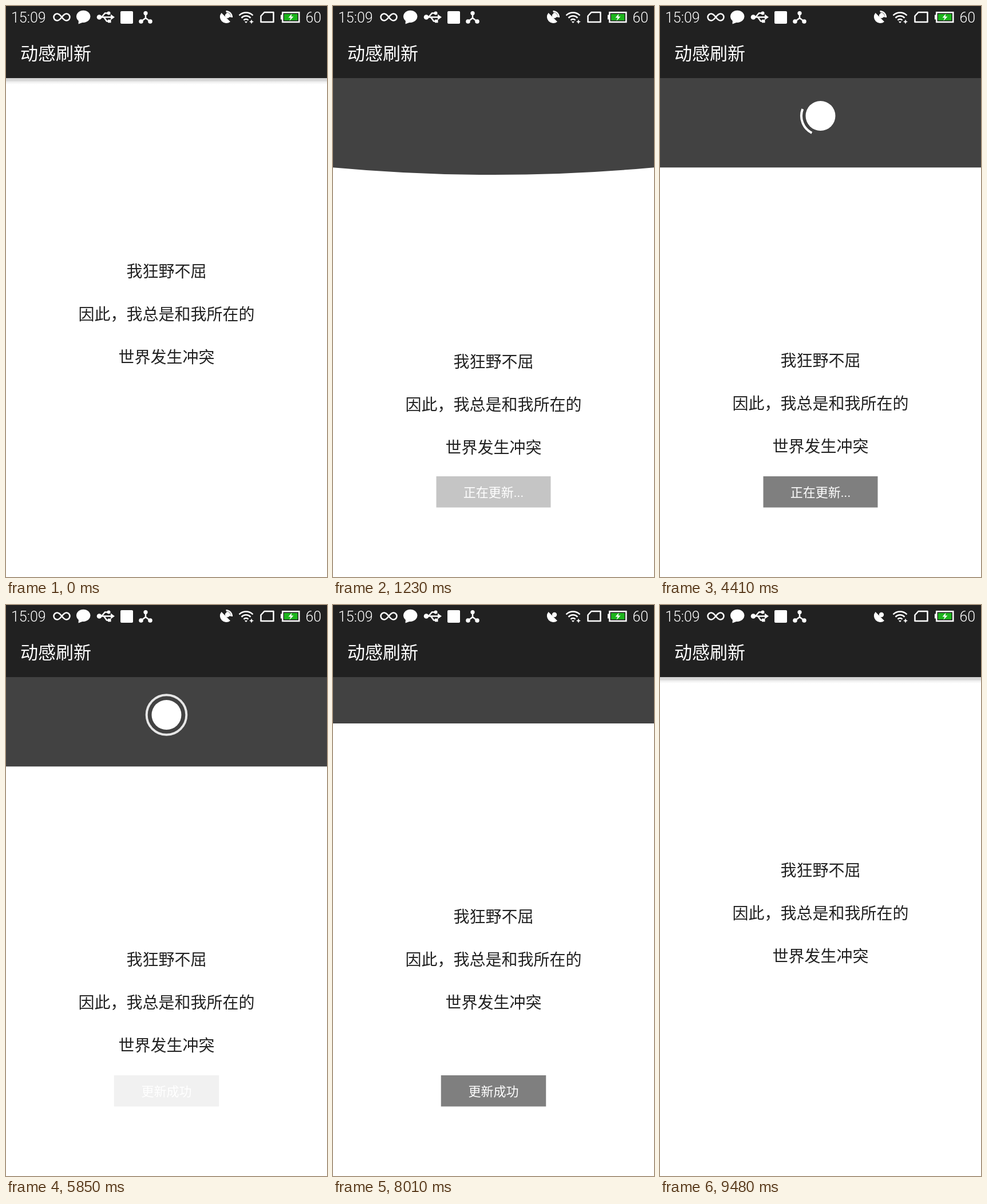
An HTML page for the animation above (9510 ms loop, 561 by 998 pixels).

```html
<!DOCTYPE html>
<html lang="zh-CN">
<head>
<meta charset="utf-8">
<title>动感刷新</title>
<style>
html, body { margin: 0; width: 100%; height: 100%; overflow: hidden; background: #fff; }
svg { display: block; width: 561px; height: 998px; }
text { font-family: Roboto, "Noto Sans CJK SC", "Noto Sans CJK", sans-serif; }
.light { font-weight: 300; font-size: 25px; }
.mid { text-anchor: middle; }
.line { fill: none; stroke: #fff; stroke-width: 2.5; }
</style>
</head>
<body>
<svg viewBox="0 0 561 998" fill="#fff">
  <defs>
    <linearGradient id="shade" x2="0" y2="1">
      <stop offset="0" stop-color="#d0d0d0"/>
      <stop offset=".45" stop-color="#dadada"/>
      <stop offset=".55" stop-color="#ececec"/>
      <stop offset="1" stop-color="#fff"/>
    </linearGradient>
  </defs>
  <rect width="561" height="998"/>
  <rect y="126" width="561" height="11" fill="url(#shade)"/>

  <g transform="translate(0 126)">
    <path id="header" fill="#424242"/>
    <path id="tail"/>
    <circle id="ball" cx="280.5" r="26"/>
    <path id="ring" class="line" style="stroke-width:4"/>
  </g>

  <g id="verse" class="mid" fill="#212121" font-size="28">
    <text x="280.5" y="474">我狂野不屈</text>
    <text x="280.5" y="549">因此，我总是和我所在的</text>
    <text x="280.5" y="624">世界发生冲突</text>
  </g>

  <g id="toast">
    <rect id="plate" y="822" height="54.5" fill="#000" fill-opacity=".5"/>
    <text id="label" class="mid" x="280.5" y="857.5" font-size="22"></text>
  </g>

  <rect width="561" height="126" fill="#212121"/>
  <text x="25" y="94" font-size="31">动感刷新</text>
  <text class="light" x="9" y="29">15:09</text>
  <text class="light" x="523.5" y="29">60</text>

  <!-- status icons, left -->
  <path class="line" d="M97.5 19.5C94 15 92 13.5 89.5 13.5a6 6 0 0 0 0 12C92 25.5 94 24 97.5 19.5S103 13.5 105.5 13.5a6 6 0 0 1 0 12C103 25.5 101 24 97.5 19.5Z"/>
  <ellipse cx="135.2" cy="18.3" rx="12.2" ry="10.6"/>
  <path d="M127 24L126.5 31.5L136 28Z"/>
  <path class="line" d="M163 19.5H184M167 19.5L173 12.5H179M171 19.5L176 26.5H180"/>
  <circle cx="163" cy="19.5" r="4.3"/>
  <circle cx="179.5" cy="12.5" r="3"/>
  <path d="M183 14.5L190 19.5L183 24.5ZM178 23.7h5.5v5.5h-5.5Z"/>
  <rect x="200" y="9" width="22" height="22" rx="2"/>
  <path class="line" d="M244 13V21L236 27M244 21L252 27"/>
  <circle cx="244" cy="12.5" r="3.6"/>
  <circle cx="236" cy="27" r="3.8"/>
  <circle cx="252" cy="27" r="3.8"/>

  <!-- status icons, right -->
  <path d="M376.5 12L392 27.5A11 11 0 0 1 376.5 12Z"/>
  <circle cx="387" cy="17" r="4.2"/>
  <path id="signal" class="line" d="M385.500 12.500A6.800 6.800 0 0 1 391.800 19.500M384.500 9.200A10.300 10.300 0 0 1 394.800 20"/>
  <path class="line" d="M407.5 16.5A16.8 16.8 0 0 1 431.5 16.5M411.5 20.8A11 11 0 0 1 427.5 20.8M415.5 24.8A5.5 5.5 0 0 1 423.5 24.8"/>
  <path d="M416.8 27H422.2L419.5 30ZM429 23.5L430.2 26.3L433 27.5L430.2 28.7L429 31.5L427.8 28.7L425 27.5L427.8 26.3Z"/>
  <path class="line" stroke-linejoin="round" d="M451.5 11H467.5V28H445.5V17.5Z"/>
  <rect class="line" x="483.3" y="11.2" width="29" height="16.8"/>
  <rect x="480" y="15.5" width="3" height="8"/>
  <rect x="486" y="14" width="23.6" height="11.2" fill="#1cb41c"/>
  <path d="M499.5 13.5L493.5 20.5H497.5L495.5 26L502.5 18.5H498.5Z"/>
</svg>
<script>
const LOOP = 9510, STEP = 30;
const W = 561, MID = W / 2, REST = 156.15, FLOOR = 156;
const R = 26, BALL_Y = 66, DIP = 39, MAX_PULL = 78;
// start times of the phases
const T = { release: 943, spring: 1287, pop: 1631, outer: 2147, spin: 2491, done: 5782, close: 7506, end: 8538 };
const TICK = 28.7, TOAST_HOLD = 3490;

const $ = id => document.getElementById(id);
const set = (id, attrs) => { for (const k in attrs) $(id).setAttribute(k, attrs[k]); };
const show = (id, on) => { $(id).style.display = on ? '' : 'none'; };
const clamp = x => Math.max(0, Math.min(1, x));
const span = (t, a, b) => clamp((t - a) / (b - a));
const ease = u => .5 - .5 * Math.cos(Math.PI * u);

// height of the pulled area and how far its lower edge bends
function pull(t) {
  if (t < T.release) {
    const h = (REST + MAX_PULL) * ease(span(t, 0, 900));
    return { shift: h, edge: Math.min(h, REST), bend: Math.max(0, h - REST) * 2 };
  }
  if (t >= T.close) {
    const h = REST * (1 - ease(span(t, T.close, T.end)));
    return { shift: h, edge: h, bend: 0 };
  }
  const settle = MAX_PULL * Math.pow(1 - span(t, T.release, T.release + 602), 6);
  let bend = 2 * MAX_PULL * (1 - span(t, T.release, T.spring));
  if (t >= T.spring) bend = -DIP * span(t, T.spring, T.pop);
  if (t >= T.outer) bend = -DIP * (1 - span(t, T.outer, T.spin));
  return { shift: FLOOR + settle, edge: REST, bend };
}

function neck(y, base, f) {
  const a = R * .75 * (1 - f), b = a + R / 2;
  return `M${MID + R} ${y}Q${MID + a} ${base} ${MID + b} ${base}H${MID - b}Q${MID - a} ${base} ${MID - R} ${y}Z`;
}

function arc(r, from, sweep) {
  const pt = deg => {
    const a = deg * Math.PI / 180;
    return `${MID + r * Math.cos(a)} ${BALL_Y + r * Math.sin(a)}`;
  };
  const half = from + sweep / 2;
  return `M${pt(from)}A${r} ${r} 0 0 1 ${pt(half)}A${r} ${r} 0 0 1 ${pt(from + sweep)}`;
}

// both ends of the arc run forward; the faster one alternates
function spinner(n) {
  let start = 90, sweep = 0, growing = true;
  while (n-- > 0) {
    start += growing ? 3 : 10;
    sweep += growing ? 7 : -7;
    if (sweep >= 270) growing = false;
    else if (sweep <= 10) growing = true;
  }
  return arc(33.5, start % 360, sweep);
}

function ball(t) {
  let y = BALL_Y, tail = '', ring = '', fade = 1;
  const d = span(t, T.done, T.close);
  if (t < T.outer) {
    const p = span(t, T.pop, T.outer), top = FLOOR - DIP / 2;
    y = top + R + (BALL_Y - top - R) * p;
    if (p < .9 && y < top) tail = neck(y, top + 1, p);
  } else if (t >= T.spin && t < T.done) {
    ring = spinner(Math.floor((t - T.spin) / TICK));
  } else if (t >= T.done && d < .3) {
    ring = arc(33.5 + 10 * d / .3, 0, 359.99);
    fade = 1 - d / .3;
  } else if (d >= .3 && d < .7) {
    const f = (d - .3) / .4;
    y = BALL_Y + (FLOOR + R / 2 - BALL_Y) * f;
    if (y > FLOOR - 2 * R && y < FLOOR) tail = neck(y, FLOOR, f);
  } else if (d >= .7) {
    const f = (d - .7) / .3, half = R + 2 * R * f;
    tail = `M${MID - half} ${FLOOR}Q${MID} ${FLOOR - R * (1 - f)} ${MID + half} ${FLOOR}Z`;
  }
  show('ball', t >= T.pop && d < .7);
  set('ball', { cy: y });
  set('tail', { d: t >= T.pop && t < T.close ? tail : '' });
  set('ring', { d: ring, opacity: fade });
}

function toast(t) {
  const second = t >= T.done;
  const age = t - (second ? T.done : T.release);
  const alpha = span(age, 0, 638) * (1 - span(age, TOAST_HOLD, TOAST_HOLD + 200));
  const width = second ? 183.5 : 200;
  set('toast', { opacity: alpha });
  set('plate', { x: MID - width / 2, width });
  $('label').textContent = second ? '更新成功' : '正在更新...';
}

function draw(t) {
  const { shift, edge, bend } = pull(t);
  set('header', { d: `M0 0H${W}V${edge}Q${MID} ${edge + bend} 0 ${edge}Z` });
  set('verse', { transform: `translate(0 ${Math.round(shift)})` });
  ball(t);
  toast(t);
  const phase = t % 1470;
  show('signal', phase < 100 || phase >= 835);
}

const began = performance.now();
function tick() {
  const t = (performance.now() - began) % LOOP;
  draw(Math.floor(t / STEP) * STEP);
  requestAnimationFrame(tick);
}
tick();
</script>
</body>
</html>
```
